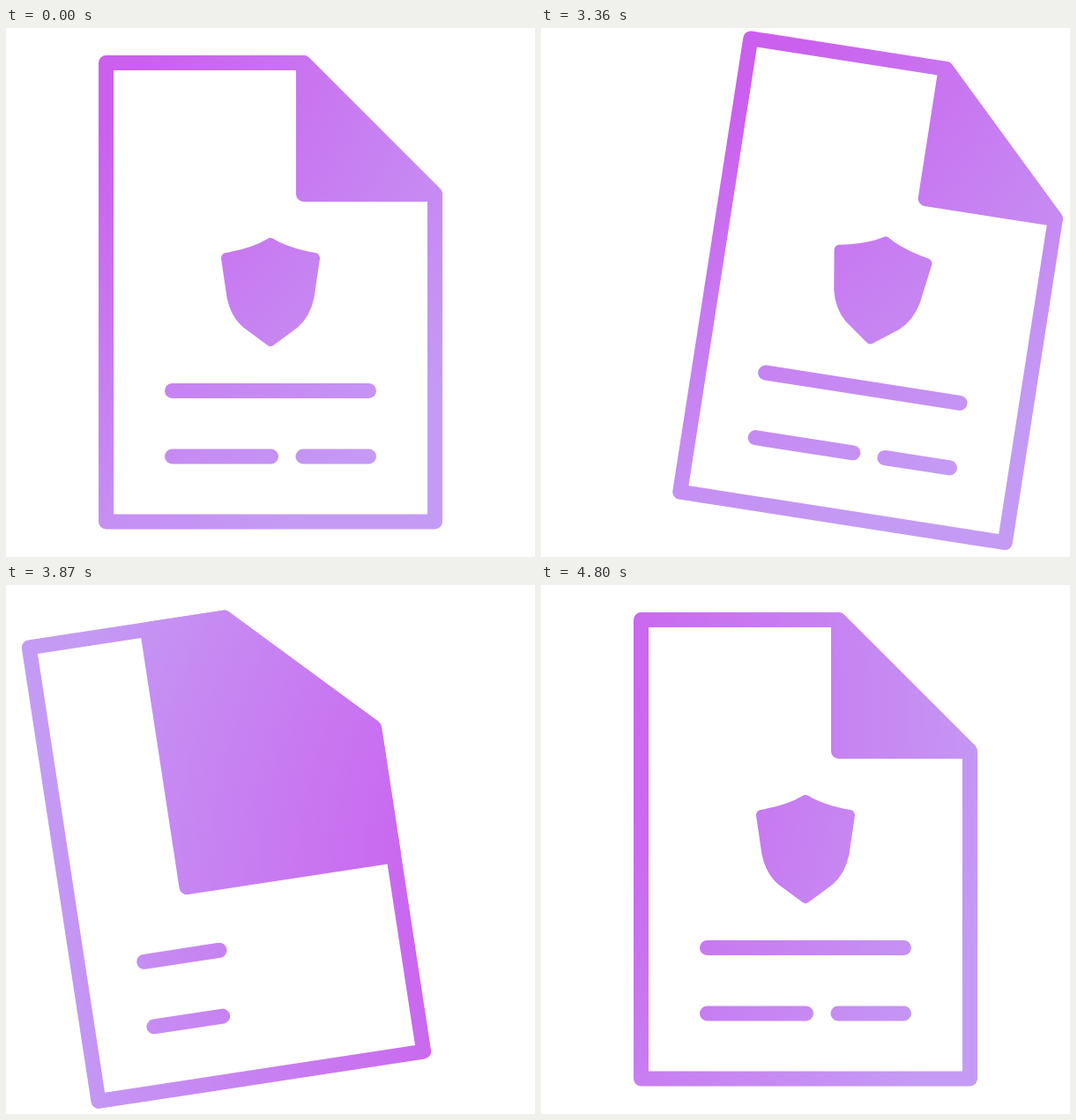
An HTML page for the animation above (4830 ms loop, 600 by 600 pixels).

```html
<!DOCTYPE html>
<html lang="en">
<head>
<meta charset="utf-8">
<title>Protected document</title>
<style>
  html, body { margin: 0; width: 100%; height: 100%; overflow: hidden; background: #fff; }
  svg { display: block; width: 100vw; height: 100vh; }
</style>
</head>
<body>
<svg viewBox="0 0 600 600">
  <defs>
    <radialGradient id="tint" gradientUnits="userSpaceOnUse" r="820">
      <stop offset=".39" stop-color="#cb5fee"/>
      <stop offset="1" stop-color="#c49bf4"/>
    </radialGradient>
  </defs>
  <g id="doc" fill="none" stroke="url(#tint)" stroke-width="17" stroke-linecap="round" stroke-linejoin="round">
    <path d="M337.5 39.5H113.5V560H486.5V188.5Z"/>
    <path id="line1"/>
    <path id="line2"/>
    <path id="line3"/>
    <path id="shield" fill="url(#tint)" stroke-width="12"
      d="M300 244Q318 255 350 261L343.5 305Q339.5 324 327 335L300 355L273 335Q260.5 324 256.5 305L250 261Q282 255 300 244Z"/>
    <path id="fold" fill="url(#tint)"/>
  </g>
</svg>
<script>
const LOOP = 4830, HOLD = 3000, STEP = 30;
const $ = id => document.getElementById(id);

const linear = s => s;
const easeOut = s => s * (2 - s);
const easeInOut = s => s * s * (3 - 2 * s);

// Value over time, eased between [step, value] poses
function track(ease, ...poses) {
  return k => {
    const next = poses.findIndex(([step]) => k < step);
    if (next === 0) return poses[0][1];
    if (next < 0) return poses[poses.length - 1][1];
    const [t0, v0] = poses[next - 1], [t1, v1] = poses[next];
    return v0 + (v1 - v0) * ease((k - t0) / (t1 - t0));
  };
}

// The page swings right, left, right and settles
const shiftX = track(easeInOut, [0, 0], [12, 82], [25.5, -50], [30, -50], [46, 23.5], [60, 0]);
const shiftY = track(easeInOut, [0, 0], [12, -2], [24, -2], [36, 4], [46, -13], [60, 0]);
const tilt = track(easeInOut, [0, 0], [12, 8.85], [30, -8.85], [46, 4.6], [60, 0]);
const tintAngle = track(linear, [12, -135], [36, 74], [60, 195]);

const foldSize = track(easeInOut, [12, 1], [23, 2], [25, 2], [35, .28], [48, 1]);
const shieldScale = track(easeInOut, [24, 1], [24, 0], [34, 1.1], [44, .95], [52, 1]);
const shieldTilt = track(easeInOut, [28, 0], [44, -14.5], [60, 0]);

// Lines vanish under the fold, then draw themselves again
const lines = [
  { id: "line1", x: 188.5, y: 411.5, length: 223, part: track(easeOut, [24, 1], [24, 0], [47, 1]) },
  { id: "line2", x: 188.5, y: 486, length: 112, part: track(easeOut, [24, 1], [24, 0], [35, 1]) },
  { id: "line3", x: 337, y: 486, length: 74.5, part: track(easeOut, [24, 1], [24, 0], [36, 0], [54, 1]) },
];

const mix = (p, q, s) => p.map((v, i) => v + (q[i] - v) * s);

// Size 0 is a flat corner, 1 the resting fold, 2 covers the whole page
function foldPath(size) {
  const top = [337.5, 39.5], right = [486.5, 188.5], inner = [337.5, 188.5];
  if (size >= 1) {
    const s = size - 1;
    const a = mix(top, [113.5, 39.5], s);
    const b = mix(right, [486.5, 560], s);
    const m = mix(inner, [113.5, 560], s);
    return `M${top}L${a}L${m}L${b}L${right}Z`;
  }
  const m = mix(mix(top, right, .5), inner, size);
  const bend = 46 * (1 - size), pull = .12 + .45 * size;
  return `M${top}C${mix(top, inner, pull)} ${m[0] - bend},${m[1] - bend} ${m}`
    + `C${m[0] + bend},${m[1] + bend} ${mix(right, inner, pull)} ${right}Z`;
}

function draw(k) {
  $("doc").setAttribute("transform",
    `translate(${shiftX(k)} ${shiftY(k)}) rotate(${tilt(k)} 300 300)`);

  const angle = tintAngle(k) * Math.PI / 180;
  $("tint").setAttribute("cx", 300 + 600 * Math.cos(angle));
  $("tint").setAttribute("cy", 300 + 600 * Math.sin(angle));

  $("fold").setAttribute("d", foldPath(foldSize(k)));
  $("shield").setAttribute("transform",
    `translate(300 300) rotate(${shieldTilt(k)}) scale(${shieldScale(k)}) translate(-300 -300)`);

  for (const { id, x, y, length, part } of lines) {
    const drawn = length * part(k);
    $(id).setAttribute("d", drawn > 0 ? `M${x} ${y}h${drawn}` : "");
  }
}

function frame() {
  const t = performance.now() % LOOP;
  draw(Math.max(0, Math.floor((t - HOLD) / STEP)));
  requestAnimationFrame(frame);
}
frame();
</script>
</body>
</html>
```
